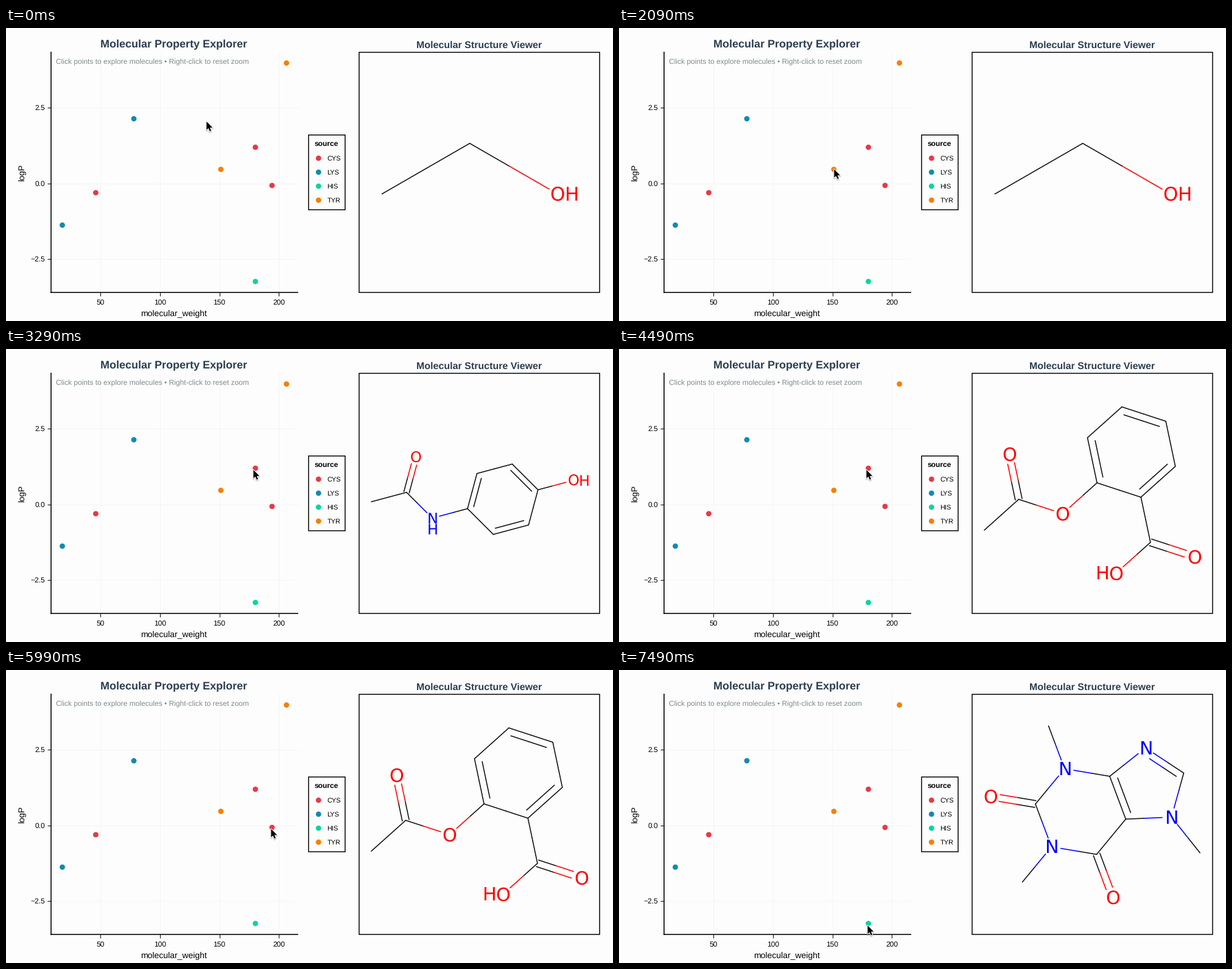
Animation, 997 px wide and 482 px high, one loop 8 s. Source, as a matplotlib script:

```python
import math

import matplotlib.pyplot as plt
import numpy as np
from matplotlib.animation import FuncAnimation
from matplotlib.collections import LineCollection
from matplotlib.patches import Circle, Polygon, Rectangle

W, H, DPI = 997, 482, 64
PT = 72 / DPI  # points per pixel
LOOP, STEP, LEAD = 8000, 25, 15

plt.rcParams["text.hinting"] = "none"
plt.rcParams["font.family"] = "Liberation Sans"

BACK, INK, SLATE = "#fdfdfd", "#000000", "#2c3e50"
SOURCES = {"CYS": "#e63946", "LYS": "#118ab2", "HIS": "#06d6a0", "TYR": "#f77f00"}

fig = plt.figure(figsize=(W / DPI, H / DPI), dpi=DPI, facecolor=BACK)
ax = fig.add_axes([0, 0, 1, 1])
ax.set_xlim(0, W)
ax.set_ylim(H, 0)
ax.axis("off")


def label(x, y, s, px, color=INK, **kw):
    kw.setdefault("va", "baseline")
    return ax.text(x, y, s, fontsize=px * PT, color=color, **kw)


def stroke(x0, y0, x1, y1, width, color=INK):
    ax.plot([x0, x1], [y0, y1], color=color, lw=width * PT, solid_capstyle="butt")


def dot(x, y, source):
    ax.add_patch(Circle((x, y), 4.4, fc=SOURCES[source], lw=0, zorder=3))


def box(x0, y0, x1, y1):
    ax.add_patch(Rectangle((x0, y0), x1 - x0, y1 - y0, fc="none", ec=INK,
                           lw=1.5 * PT, snap=False))


# ---- scatter plot
def px_x(weight):
    return 57.3 + 1.955 * weight


def px_y(logp):
    return 255.5 - 49.85 * logp


def draw_scatter():
    for v in range(50, 201, 50):
        x = px_x(v)
        stroke(x, 40, x, 434, 1, "#f4f4f4")
        stroke(x, 435, x, 441, 1)
        label(x, 455, str(v), 12, ha="center")
    for v in (2.5, 0, -2.5):
        y = px_y(v)
        stroke(75, y, 480, y, 1, "#f4f4f4")
        stroke(68, y, 74, y, 1)
        label(64, y + 4.2, f"{v:.1f}".replace("-", "\u2212"), 12, ha="right")
    stroke(74, 39, 74, 435.7, 1.6)
    stroke(73.2, 435, 480, 435, 1.6)

    label(155, 31, "Molecular Property Explorer", 18, SLATE, weight="bold")
    label(81.5, 60, "Click points to explore molecules \u2022 Right-click to reset zoom",
          12, "#7f8c8d")
    label(276, 474, "molecular_weight", 14, ha="center")
    label(26.5, 237.5, "logP", 14, ha="center", va="center", rotation=90)

    for weight, logp, source in (
        (18, -1.38, "LYS"), (78.1, 2.13, "LYS"), (46.1, -0.31, "CYS"),
        (180.2, 1.19, "CYS"), (194.2, -0.07, "CYS"), (151.2, 0.46, "TYR"),
        (206.3, 3.97, "TYR"), (180.2, -3.24, "HIS"),
    ):
        dot(px_x(weight), px_y(logp), source)


def draw_legend():
    box(497, 176, 557, 299)
    label(506.5, 194, "source", 12, weight="bold")
    for i, name in enumerate(SOURCES):
        y = 214.2 + 23 * i
        dot(513.3, y, name)
        label(527.5, y + 4, name, 11)


# ---- molecules, grown by a turtle: a letter steps one bond ahead to a new atom,
# brackets branch, a digit opens or closes a ring, "=" and ":" are double bonds
# (":" has its second line inside the ring) and the signs below turn.
TURNS = {"+": 60, "-": -60, "*": 72, "~": -54}
VALENCE = {"C": 4, "O": 2, "N": 3}
ELEMENTS = {"C": "#111111", "O": "#ff0000", "N": "#0000ff"}
ADVANCE = {"O": 0.787, "N": 0.748, "H": 0.752}

# formula, start, bond length, heading
MOLECULES = [
    ("CC+O", (617.5, 273), 166.5, -30),
    ("CC(-=O)+N-C1-:C+C+:C(-O)+C+:C+1", (600, 251.3), 59.9, -15),
    ("CC(-=O)+O-C1-:C+C+:C+C+:C(-C(-=O)+O)+1", (600, 298), 75.9, -41.9),
    ("CN1+C(+=O)-N(+C)-C(+=O)-C2-:C1*N*:C*N(~C)2", (705.5, 92), 75.2, 69.5),
]


def grow(formula, start, length, heading):
    atoms, bonds, stack, rings = [], [], [], {}
    here, kind = None, ""
    for c in formula:
        if c in TURNS:
            heading += TURNS[c]
        elif c == "(":
            stack.append((here, heading))
        elif c == ")":
            here, heading = stack.pop()
        elif c in "=:":
            kind = c
        elif c.isdigit():
            if c in rings:
                bonds.append((here, rings[c], ""))
            rings.setdefault(c, here)
        else:
            a = math.radians(heading)
            ahead = np.array([math.cos(a), math.sin(a)])
            pos = np.array(start) if here is None else atoms[here][1] + length * ahead
            if here is not None:
                bonds.append((here, len(atoms), kind))
            here, kind = len(atoms), ""
            atoms.append((c, pos, ahead))
    return atoms, bonds


def build_molecule(formula, start, length, heading):
    atoms, bonds = grow(formula, start, length, heading)
    px = min(0.4 * length, 31)
    segs, colors = [], []
    free = [VALENCE[name] for name, _, _ in atoms]

    def line(a, b, offset, trim=0.0):
        p, q = atoms[a][1], atoms[b][1]
        d = (q - p) / math.dist(p, q)
        shift = np.array([-d[1], d[0]]) * offset * length
        cuts = [trim * length if atoms[k][0] == "C" else 0.51 * px for k in (a, b)]
        p, q = p + shift + d * cuts[0], q + shift - d * cuts[1]
        mid = (p + q) / 2
        segs.extend([(p, mid), (mid, q)])
        colors.extend(ELEMENTS[atoms[k][0]] for k in (a, b))

    for a, b, kind in bonds:
        for k in (a, b):
            free[k] -= 2 if kind else 1
        if kind == "=":
            line(a, b, 0.075)
            line(a, b, -0.075)
        else:
            line(a, b, 0)
            if kind:
                line(a, b, 0.15, 0.095)

    group = [ax.add_collection(LineCollection(
        segs, colors=colors, linewidths=1.6 * PT, capstyle="round", zorder=2))]

    def letter(c, x, y, color):
        group.append(label(x - ADVANCE[c] * px / 2, y + 0.35 * px, c, px, color,
                           family="DejaVu Sans"))

    # spare valence on O and N shows as an H beside or below
    for (name, (x, y), ahead), spare in zip(atoms, free):
        if name == "C":
            continue
        letter(name, x, y, ELEMENTS[name])
        if spare and name == "N":
            letter("H", x, y + 0.79 * px, ELEMENTS[name])
        elif spare:
            letter("H", x + math.copysign(0.77 * px, ahead[0]), y, ELEMENTS[name])
    return group


# ---- pointer
ARROW = np.array([(0, 0), (0, 14.6), (3.3, 11.6), (5.7, 17), (8.1, 16),
                  (5.8, 10.7), (10.4, 10.5)]) * 0.94 + 0.4


def build_pointer():
    layers = []
    for dy, grown, color, alpha in ((1.6, 4, INK, 0.06), (1.3, 2.6, INK, 0.12),
                                    (0, 1.9, "#ffffff", 1), (0, 0, INK, 1)):
        patch = Polygon(ARROW, fc=color, ec=color, lw=grown * PT, alpha=alpha,
                        joinstyle="round", zorder=6)
        ax.add_patch(patch)
        layers.append((patch, ARROW + (0, dy)))
    return layers


# start ms, number of steps, control point, end point
BEAT = 150
HOME = (329, 153.5)
MOVES = [
    (1190, 7, (332, 200), (353, 232)),
    (2840, 4, (384, 229), (406, 198.5)),
    (5240, 6, (426, 215), (435, 261)),
    (6740, 6, (437, 380), (408, 420)),
]
SWITCHES = (2690, 4490, 6140)


def pointer_at(t):
    pos = np.array(HOME)
    for start, steps, bend, end in MOVES:
        if t < start:
            break
        done = min((t - start) // BEAT + 1, steps)
        u = (1 - math.cos(math.pi * done / steps)) / 2
        pos = ((1 - u) ** 2 * pos + 2 * u * (1 - u) * np.array(bend)
               + u * u * np.array(end))
    return pos


draw_scatter()
draw_legend()
label(674, 33, "Molecular Structure Viewer", 16, SLATE, weight="bold")
box(580, 40, 975, 435)
groups = [build_molecule(*m) for m in MOLECULES]
pointer = build_pointer()


def update(i):
    t = i * STEP + LEAD
    shown = sum(t >= s for s in SWITCHES)
    for k, group in enumerate(groups):
        for artist in group:
            artist.set_visible(k == shown)
    pos = pointer_at(t)
    for patch, shape in pointer:
        patch.set_xy(shape + pos)
    return []


anim = FuncAnimation(fig, update, frames=LOOP // STEP, interval=STEP,
                     init_func=lambda: update(0), repeat=True, repeat_delay=0)
plt.show()
```
